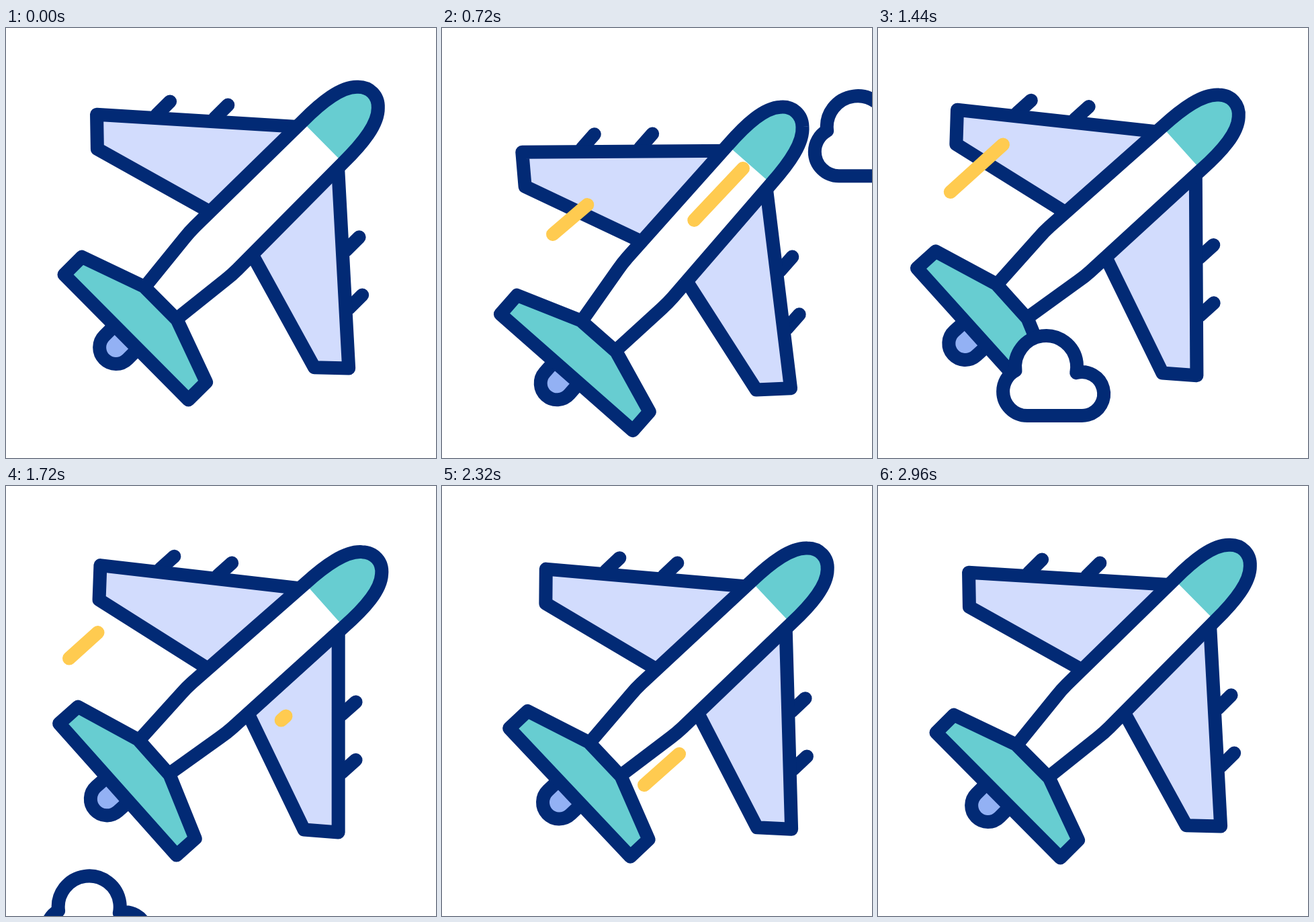
Write an HTML page with a canvas that moves like this. It is 640 px wide and 640 px high and loops after 3000 ms.

```html
<!DOCTYPE html>
<html lang="en">
<head>
<meta charset="utf-8">
<title>Plane</title>
<style>
html, body { margin: 0; width: 100%; height: 100%; overflow: hidden; background: #fff; }
canvas { display: block; width: 640px; height: 640px; }
</style>
</head>
<body>
<canvas id="stage" width="640" height="640"></canvas>
<script>
const ctx = document.getElementById('stage').getContext('2d');
const LOOP = 3000, STEP = 40, RAD = Math.PI / 180;
const NAVY = '#022a75', TEAL = '#67cdd1', PALE = '#d2dcfd', BLUE = '#93b1f4', YELLOW = '#ffcb50';

// Eased keys [time, value] for the plane
const HEADING = -44.8;
const TILT = [[0, 0], [760, -3.9], [1560, 3.2], [LOOP, 0]];
const RISE = [[0, 0], [760, 43.3], [1560, -0.8], [LOOP, 0]];
const SWAY = [[500, 0], [1475, -26.5], [2040, 27], [2640, 0]];

// Streaks: start time, origin, reach
const STREAKS = [
  { start: 0, x: 320.5, y: 174, dx: -155.5, dy: 133 },
  { start: 355, x: 448, y: 209, dx: -92.5, dy: 98 },
  { start: 1047, x: 186, y: 173.5, dx: -92, dy: 83 },
  { start: 1643, x: 416.5, y: 342.5, dx: -115.5, dy: 102.5 }
];
const DRAW = 520, LAG = 400;
const CLOUD = { start: 280, time: 1840, travel: 674, lead: 315, slope: -0.968 };

function ease(u) {
  u = Math.min(1, Math.max(0, u));
  return u * u * (3 - 2 * u);
}

// Sum of the eased steps between neighbouring keys
function value(keys, t) {
  let v = keys[0][1];
  for (let i = 1; i < keys.length; i++) {
    const [t0, a] = keys[i - 1], [t1, b] = keys[i];
    v += (b - a) * ease((t - t0) / (t1 - t0));
  }
  return v;
}

function paint(path, fill, line = NAVY) {
  if (fill) { ctx.fillStyle = fill; ctx.fill(path); }
  if (line) { ctx.strokeStyle = line; ctx.stroke(path); }
}

// Plane parts lie along the x axis, nose to the right
const shape = d => new Path2D(d);
const NOSE = 'L209.5 -43.2C251 -43.5 287 -39.5 304 -22C317.5 -9.5 317.5 9.5 304 22C287 39.5 251 43.5 209.5 43.2';
const engines = shape('M91 203h-28M148.5 138.6h-28');
const wing = shape('M207 34L0 266.2L-35.5 229.2L20.4 34Z');
const rudder = shape('M-205 24.5H-224a24.5 24.5 0 0 1 0 -49H-205');
const body = shape('M-135 -33L-37 -43.6Q-26 -45 -14 -45' + NOSE + 'L-14 45Q-26 45 -37 43.6L-135 33Z');
const cone = shape(NOSE.replace('L', 'M') + 'Z');
const tail = shape('M-202.4 -131.3H-165L-130.5 -35V35L-165 131.3H-202.4Z');

const cloud = new Path2D();
cloud.arc(454.5, 398.5, 32.5, -105 * RAD, 90 * RAD);
cloud.arc(373, 395, 36, 90 * RAD, 240 * RAD);
cloud.arc(401, 358, 46, 172.5 * RAD, 370 * RAD);
cloud.closePath();

function drawPlane(t) {
  ctx.save();
  ctx.translate(322.6 + value(SWAY, t), 317.6 + value(RISE, t));
  ctx.rotate((HEADING + value(TILT, t)) * RAD);
  for (let side = 0; side < 2; side++) {
    paint(engines);
    paint(wing, PALE);
    ctx.scale(1, -1);
  }
  paint(rudder, BLUE);
  paint(body, '#fff', null);
  paint(cone, TEAL, null);
  paint(body);
  paint(tail, TEAL);
  ctx.restore();
}

function drawStreak({ start, x, y, dx, dy }, t) {
  const head = ease((t - start) / DRAW), end = ease((t - start - LAG) / DRAW);
  if (head <= end) return;
  ctx.strokeStyle = YELLOW;
  ctx.beginPath();
  for (const k of [end, head]) ctx.lineTo(x + dx * k, y + dy * k);
  ctx.stroke();
}

function drawCloud(t) {
  const u = (t - CLOUD.start) / CLOUD.time;
  if (u < 0 || u > 1) return;
  const d = CLOUD.lead - CLOUD.travel * ease(u);
  ctx.save();
  ctx.translate(d, CLOUD.slope * d);
  paint(cloud, '#fff');
  ctx.restore();
}

function frame(now) {
  const t = Math.floor((now % LOOP) / STEP) * STEP;
  ctx.fillStyle = '#fff';
  ctx.fillRect(0, 0, 640, 640);
  ctx.lineWidth = 20;
  ctx.lineCap = ctx.lineJoin = 'round';
  drawPlane(t);
  STREAKS.forEach(s => drawStreak(s, t));
  drawCloud(t);
}

let begin = null;
function tick(now) {
  if (begin === null) begin = now;
  frame(Math.max(0, now - begin));
  requestAnimationFrame(tick);
}
frame(0);
requestAnimationFrame(tick);
</script>
</body>
</html>
```
